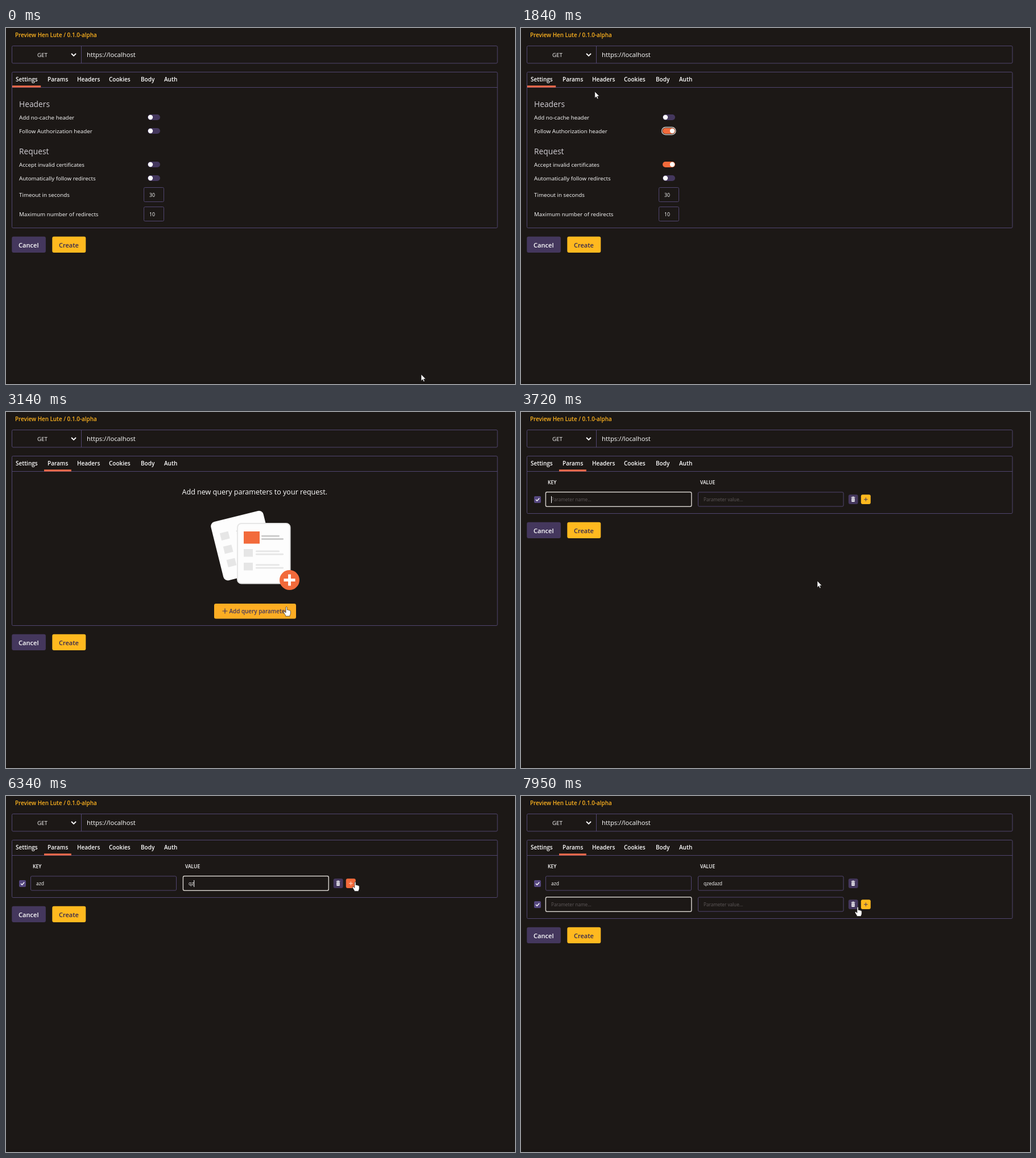
Animation, 895 px wide and 626 px high, one loop 8 s. Source, as an HTML page:

```html
<!DOCTYPE html>
<html lang="en">
<head>
<meta charset="utf-8">
<title>Request editor</title>
<style>
html, body { margin: 0; width: 100%; height: 100%; overflow: hidden; background: #1c1816; }
svg { display: block; font-family: "Open Sans", "Noto Sans", sans-serif; }
</style>
</head>
<body>
<svg id="stage" width="895" height="626" viewBox="0 0 895 626"></svg>
<script>
const LOOP = 8000;
const BG = '#1c1816', LINE = '#50456f', PURPLE = '#44375d', WHITE = '#fff', RING = '#cfcbc6';
const AMBER = [255, 185, 31], ORANGE = [242, 106, 59];
const stage = document.getElementById('stage');
const ruler = document.createElement('canvas').getContext('2d');

// Moments of the clicks and of the Tab key
const CLICK = { certs: 1000, auth: 1500, params: 2280, add: 3510, second: 6930 };
const TAB_TIME = 5920;

const BURSTS = [
  { field: 'key', text: 'azd', at: 4980, gap: 75 },
  { field: 'value', text: 'qzed', at: 6310, gap: 25 },
  { field: 'value', text: 'azd', at: 6565, gap: 25 }
];
const STROKES = BURSTS.flatMap(({ field, text, at, gap }) =>
  [...text].map((char, i) => ({ field, char, at: at + i * gap })));
const CARET_RESETS = [CLICK.add, TAB_TIME, CLICK.second, ...STROKES.map(s => s.at)];

const REST = [730, 609];
const MOVES = [
  { from: 0, to: 820, x: 257, y: 236 },
  { from: 1050, to: 1300, x: 257, y: 178 },
  { from: 1640, to: 1930, x: 92, y: 92 },
  { from: 2430, to: 3160, x: 494, y: 343 },
  { from: 3500, to: 3720, x: 521, y: 297 },
  { from: 3720, to: 4340, x: 614, y: 151 },
  { from: 7410, to: 7950, x: 592, y: 195 }
];

let hotspots = [];

const ramp = (t, from, to) => Math.max(0, Math.min(1, (t - from) / (to - from)));
const smooth = u => u * u * (3 - 2 * u);
const rgb = c => `rgb(${c.map(Math.round)})`;
const mix = (a, b, k) => rgb(a.map((v, i) => v + (b[i] - v) * k));

const rect = (x, y, w, h, fill, r = 0, more = '') =>
  `<rect x="${x}" y="${y}" width="${w}" height="${h}" rx="${r}" fill="${fill}" ${more}/>`;
const frame = (x, y, w, h, stroke = LINE, width = 1, r = 2) =>
  rect(x, y, w, h, 'none', r, `stroke="${stroke}" stroke-width="${width}"`);
const stroke = (d, color, width) =>
  `<path d="${d}" fill="none" stroke="${color}" stroke-width="${width}"/>`;
const text = (s, x, y, size, fill = WHITE, weight = 500) =>
  `<text x="${x}" y="${y}" font-size="${size}" font-weight="${weight}" fill="${fill}">${s}</text>`;
const plus = (x, y, r, color, width) =>
  stroke(`M${x - r} ${y}h${2 * r}M${x} ${y - r}v${2 * r}`, color, width);

function button(x, y, w, h, fill, r = 3) {
  hotspots.push([x, y, w, h]);
  return rect(x, y, w, h, fill, r);
}

function widthOf(s, size, weight = 500) {
  ruler.font = `${weight} ${size}px "Open Sans", "Noto Sans", sans-serif`;
  return ruler.measureText(s).width;
}

function header(active) {
  let s = text('Preview Hen Lute / 0.1.0-alpha', 16, 16, 9.85, '#ffb31f', 600)
    + frame(10.5, 31.5, 853.6, 30.5) + stroke('M132.5 31.5v30.5', LINE, 1)
    + text('GET', 55, 50.5, 9.8) + stroke('M115 45l4 4 4-4', WHITE, 1.8)
    + text('https://localhost', 142, 51, 11.3) + stroke('M10.5 104.5h853.6', LINE, 1);
  const tabs = { Settings: 17, Params: 73, Headers: 125, Cookies: 181, Body: 237, Auth: 278 };
  for (const name in tabs) {
    const x = tabs[name], w = widthOf(name, 10, 600) + 11.5;
    s += button(x - 6, 78, w, 25, 'none') + text(name, x, 93.5, 10, WHITE, 600);
    if (name === active) s += rect(x - 6, 101.2, w, 3.3, '#ef6a4b');
  }
  return s;
}

function toggle(y, on, focused) {
  return button(249, y - 5, 22, 10, mix([68, 55, 93], ORANGE, on), 5)
    + `<circle cx="${254 + 12 * on}" cy="${y}" r="4.2" fill="#fff"/>`
    + (focused ? frame(247.5, y - 6.5, 24.5, 13, RING, 1.4, 6.5) : '');
}

function settings(t) {
  const heading = (s, y) => text(s, 23, y, 13.8, '#d3d0d6', 400);
  const label = (s, y) => text(s, 23, y + 4, 9.8);
  const option = (s, y, since = LOOP, until = LOOP) =>
    label(s, y) + toggle(y, ramp(t, since, since + 150), t >= since && t < until);
  const number = (s, value, y) =>
    label(s, y) + frame(242.5, y - 12.5, 35, 25) + text(value, 252, y + 3.5, 8.7);
  return heading('Headers', 139) + heading('Request', 222)
    + option('Add no-cache header', 157)
    + option('Follow Authorization header', 181, CLICK.auth)
    + option('Accept invalid certificates', 240, CLICK.certs, CLICK.auth)
    + option('Automatically follow redirects', 264)
    + number('Timeout in seconds', 30, 293) + number('Maximum number of redirects', 10, 327);
}

function sheets() {
  const pale = '#e6e6e6', orange = rgb(ORANGE);
  const lines = (x, y, long, short, fill) =>
    rect(x, y, short, 2.8, fill, 1.4) + rect(x, y + 5.3, long, 2.8, fill, 1.4);
  let back = rect(0, 0, 95, 106, '#fdfdfd', 8);
  let front = rect(418, 210, 28, 21.5, orange) + lines(449, 216.7, 39, 32, '#c8c8c8');
  for (let i = 0; i < 3; i++) {
    const y = 22 + 24.2 * i;
    back += rect(12.5, y, 15, 13, pale) + lines(41, y + 2, 40, 40, pale);
  }
  for (const y of [241, 265]) front += rect(418, y, 16, 13.5, pale) + lines(439, y + 2.5, 49, 42, pale);
  return `<g transform="translate(358.5 195) rotate(-14)">${back}</g>`
    + rect(407, 196, 92.5, 105.5, '#fdfdfd', 7, `stroke="${pale}" stroke-width="2"`) + front
    + `<circle cx="498.5" cy="295.5" r="17.5" fill="${orange}"/>` + plus(498.5, 295.5, 10, WHITE, 4.8);
}

function emptyParams(t) {
  return text('Add new query parameters to your request.', 309.5, 144.5, 12.55, WHITE, 400) + sheets()
    + button(366, 337, 144, 26.5, mix(AMBER, ORANGE, ramp(t, 3110, 3310)))
    + plus(385, 350, 4.5, PURPLE, 1.2) + text('Add query parameter', 392.5, 354, 9.9, PURPLE, 600);
}

function input(x, w, y, value, hint, focused, caret) {
  const left = x + 9.5, caretX = left + 0.5 + widthOf(value, 8.5);
  return (focused ? frame(x - 0.1, y - 0.3, w + 0.4, 25.6, RING, 1.5, 2.5) : frame(x, y, w, 25))
    + (value ? text(value, left, y + 16.2, 8.5) : text(hint, left, y + 16.2, 8.2, '#5f595a', 400))
    + (focused && caret ? stroke(`M${caretX} ${y + 7}v12`, WHITE, 1) : '');
}

function paramRow(y, { key = '', value = '' }, focus, caret, plusFill) {
  const trash = stroke(`M580.7 ${y + 9.2}h6.6M583 ${y + 8.4}h2`, WHITE, 1.2)
    + rect(581.3, y + 10.4, 5.4, 6.6, WHITE, 0.8)
    + stroke(`M583 ${y + 11.5}v4.4M585 ${y + 11.5}v4.4`, PURPLE, 0.6);
  return rect(23, y + 7, 12, 12, '#55477f', 2)
    + stroke(`M26 ${y + 13}l2.2 2.2 4-4.4`, WHITE, 1.4)
    + input(43.5, 256, y, key, 'Parameter name...', focus === 'key', caret)
    + input(311.5, 255.5, y, value, 'Parameter value...', focus === 'value', caret)
    + button(575.8, y + 4.3, 16.8, 16.8, PURPLE) + trash
    + (plusFill ? button(597.8, y + 4.3, 17, 16.8, plusFill)
      + plus(606.3, y + 12.7, 3.3, plusFill === rgb(AMBER) ? PURPLE : '#ffd9c8', 1) : '');
}

function params(t) {
  const typed = { key: '', value: '' };
  for (const s of STROKES) if (s.at <= t) typed[s.field] += s.char;
  const reset = Math.max(...CARET_RESETS.filter(at => at <= t));
  const caret = (t - reset) % 1060 < 530;
  const second = t >= CLICK.second;
  const focus = second ? '' : t < TAB_TIME ? 'key' : 'value';
  const hover = mix(AMBER, ORANGE, ramp(t, 4200, 4340));
  return text('KEY', 47, 127, 8.5, WHITE, 600) + text('VALUE', 315, 127, 8.5, WHITE, 600)
    + paramRow(141, typed, focus, caret, second ? '' : hover)
    + (second ? paramRow(178, {}, 'key', caret, rgb(AMBER)) : '');
}

function pointer(t) {
  let [x, y] = REST;
  for (const move of MOVES) {
    const k = smooth(ramp(t, move.from, move.to));
    x += (move.x - x) * k;
    y += (move.y - y) * k;
  }
  const over = hotspots.some(([l, top, w, h]) => x >= l && x <= l + w && y >= top && y <= top + h);
  const shape = over
    ? 'M-1.1 .8Q0-.9 1.1 .8V5.5Q2.5 4.8 3.2 6 4.8 5.4 5.3 6.7 7 6.2 7.2 8V11.5Q7.1 14 6 15V16.6H-1.5V15.2Q-3.4 12.5-4.6 10.2-5.2 8.6-3.6 8.4-2.2 9-1.1 10.5z'
    : 'M0 0V11.5L2.6 9 4.4 13 6.2 12.2 4.5 8.3H8z';
  return `<path d="${shape}" transform="translate(${x.toFixed(2)} ${y.toFixed(2)})" fill="#fff" stroke="#0c0a09" stroke-width=".6"/>`;
}

const PAGES = [
  { until: CLICK.params, tab: 'Settings', bottom: 351.5, content: settings },
  { until: CLICK.add, tab: 'Params', bottom: 375.5, content: emptyParams },
  { until: CLICK.second, tab: 'Params', bottom: 178.5, content: params },
  { until: LOOP, tab: 'Params', bottom: 215.5, content: params }
];

function scene(t) {
  const { tab, bottom, content } = PAGES.find(page => t < page.until);
  const top = bottom + 15.3;
  hotspots = [];
  return rect(0, 0, 895, 626, BG) + rect(0, 622, 895, 4, '#191513')
    + header(tab) + frame(10.5, 77.5, 853.6, bottom - 77.5) + content(t)
    + button(10.3, top, 59.6, 28.3, PURPLE) + text('Cancel', 22, top + 18.7, 11.1, WHITE, 600)
    + button(81.3, top, 59, 28.3, rgb(AMBER)) + text('Create', 93, top + 18.7, 11, '#33264f', 600)
    + pointer(t);
}

let start, shown;
function draw(now) {
  start ??= now;
  const markup = scene((now - start) % LOOP);
  if (markup !== shown) stage.innerHTML = shown = markup;
  requestAnimationFrame(draw);
}
requestAnimationFrame(draw);
</script>
</body>
</html>
```
